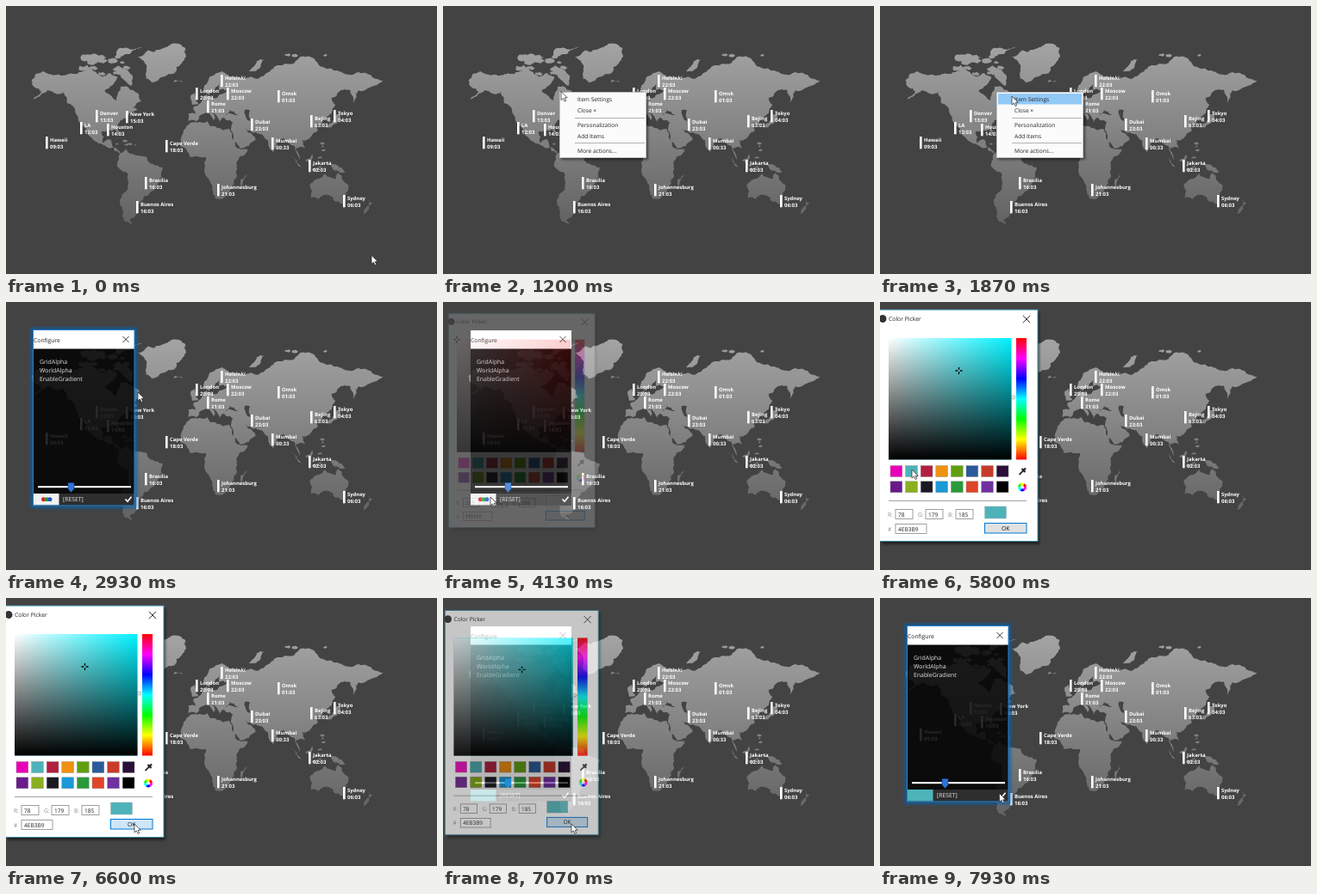
An HTML page for the animation above (8 s loop, 500x312 px).

```html
<!DOCTYPE html>
<html lang="en">
<head>
<meta charset="utf-8">
<style>
  html, body { margin: 0; width: 100%; height: 100%; overflow: hidden; background: #434343; }
  svg { display: block; width: 100%; height: 100%; font-family: "Open Sans", "Noto Sans", sans-serif; text-rendering: geometricPrecision; }
</style>
</head>
<body>
<svg id="stage" viewBox="0 0 500 312"></svg>
<script>
// Key points of the coasts as "longitude,latitude"; the detail between them is generated
const COASTS = [
  "-168,66 -156,71 -128,70 -96,68 -88,70 -81,68 -94,60 -82,53 -78,62 -65,60 -56,52 -66,48 -61,46 -70,42 -81,31 -80,25 -84,30 -97,28 -96,18 -88,21 -84,10 -78,8 -92,14 -105,20 -113,31 -118,34 -124,46 -135,59 -152,60 -166,54 -158,59 -165,62",
  "-78,8 -72,12 -52,5 -35,-6 -41,-22 -58,-37 -69,-51 -65,-55 -74,-52 -70,-18 -81,-5",
  "-60,78 -50,81 -25,83.5 -12,81.5 -16,75 -35,68 -46,64.5 -52,67 -53,75",
  "-66,63 -74,66 -86,72 -80,74 -66,69",
  "-82,77 -56,82.5 -80,81.5",
  "-24,65 -14,65 -22,66.3",
  "-5,50 1,51 -3,58.5 -6,57",
  "52,71 57,71 68,77 60,76",
  "-6,36 10,37 20,31 33,30 43,12 51,12 40,-4 40,-15 32,-29 19,-34.5 12,-17 9,4 -8,4.5 -17,14 -17,21",
  "44,-17 50,-13 46,-25",
  "-9,37 -1,37 3,42 9,44 16,38 18,40 13,45 19,42 23,36 26,40 36,36 34,29 43,13 59,21 56,25 48,30 56,27 66,25 72,20 77,8 80,15 88,22 94,17 98,15 104,1 100,13 109,12 106,20 114,22 122,29 119,36 126,34 128,40 140,50 136,55 155,60 157,51 163,60 188,66 160,70 128,73 104,78 85,74 68,69 44,67 33,67 41,67 25,71 6,61 12,57 17,60 22,65 22,60 30,60 20,55 9,57 4,52 -4,48 -2,43 -9,43",
  "130,32 140,35 145,43 140,42 137,37",
  "95,5 106,-6 102,-4",
  "109,1 117,7 116,-4",
  "131,-1 147,-6 150,-10 138,-8",
  "114,-22 130,-12 140,-17 142,-11 153,-26 147,-39 131,-31 115,-34",
  "173,-35 178,-38 168,-46.5 174,-41"
];
const SEAS = ["28,42 41,42 33,46", "48,46 53,46 53,37"];

// Island groups: left, top, width, height, count, size
const ISLANDS = [[88, 55, 58, 25, 18, 4], [355, 160, 14, 32, 8, 2], [128, 157, 22, 6, 5, 1.6], [325, 50, 70, 9, 4, 2]];

// name, time, text x, vertical centre of the name
const CITIES = [
  ["Helsinki", "22:03", 254, 84], ["London", "20:03", 225, 99], ["Moscow", "22:03", 261, 99],
  ["Rome", "21:03", 238, 114], ["Omsk", "01:03", 320, 102], ["Denver", "13:03", 109, 125],
  ["New York", "15:03", 144, 126], ["LA", "12:03", 91, 139], ["Houston", "14:03", 122, 141],
  ["Hawaii", "09:03", 51, 156], ["Cape Verde", "18:03", 190, 160], ["Dubai", "23:03", 289, 135],
  ["Mumbai", "00:33", 313, 157], ["Bejing", "03:03", 358, 131], ["Tokyo", "04:03", 385, 125],
  ["Jakarta", "02:03", 356, 183], ["Brasília", "16:03", 166, 203], ["Johannesburg", "21:03", 250, 211],
  ["Buenos Aires", "16:03", 156, 231], ["Sydney", "06:03", 396, 224]
];
const SWATCHES = "#e800b8 #4eb3b9 #b02040 #f09010 #60a010 #2a5a9a #c83a2a #2a1038 #6a1a8a #8ab020 #1a1a22 #1a9ad8 #2a9a3a #e0452a #7030a0 #000".split(" ");

const rect = (x, y, w, h, fill, more = "") => `<rect x="${x}" y="${y}" width="${w}" height="${h}" fill="${fill}" ${more}/>`;
const circle = (x, y, r, fill, more = "") => `<circle cx="${x}" cy="${y}" r="${r}" fill="${fill}" ${more}/>`;
const text = (x, y, str, fill, size = 6.8, more = "") => `<text x="${x}" y="${y}" fill="${fill}" font-size="${size}" ${more}>${str}</text>`;
const line = (d, color, width = 1, more = "") => `<path d="${d}" fill="none" stroke="${color}" stroke-width="${width}" ${more}/>`;
const cross = (x, y, r, color) => line(`M${x - r},${y - r}l${2 * r},${2 * r}m0,${-2 * r}l${-2 * r},${2 * r}`, color, .9);
const gradient = (id, axis, colors) => `<linearGradient id="${id}" ${axis}>` +
  colors.map((c, i) => `<stop offset="${i / (colors.length - 1)}" stop-color="${c}"/>`).join("") + "</linearGradient>";

let seed = 7;
const random = () => (seed = seed * 16807 % 2147483647) / 2147483647;

// Miller projection
function project(point) {
  const [lon, lat] = point.split(",").map(Number);
  const miller = 1.25 * Math.log(Math.tan(Math.PI / 4 + .4 * lat * Math.PI / 180)) * 180 / Math.PI;
  return [222 + 1.145 * lon, 181 - 1.21 * miller];
}

// Points from a to b with random midpoint displacement
function rough(a, b) {
  const dx = b[0] - a[0], dy = b[1] - a[1];
  if (Math.hypot(dx, dy) < 2.5) return [a];
  const shift = (random() - .5) * .36;
  const mid = [(a[0] + b[0]) / 2 - dy * shift, (a[1] + b[1]) / 2 + dx * shift];
  return [...rough(a, mid), ...rough(mid, b)];
}
function shape(points, fill) {
  const coast = points.flatMap((p, i) => rough(p, points[(i + 1) % points.length]));
  return `<polygon points="${coast.map(p => p.map(v => v.toFixed(1))).join(" ")}" fill="${fill}"/>`;
}
const outline = (coast, fill) => shape(coast.split(" ").map(project), fill);

function islands([left, top, width, height, count, size]) {
  return Array.from({ length: count }, () => {
    const x = left + random() * width, y = top + random() * height, r = size * (.5 + random());
    return shape([0, 1, 2, 3, 4].map(k => [x + 1.4 * r * Math.cos(k * 1.257), y + .7 * r * Math.sin(k * 1.257)]), "url(#land)");
  }).join("");
}

const hues = Array.from({ length: 7 }, (_, i) => `hsl(${360 - i * 60},100%,50%)`);
const defs = `<defs>
  ${gradient("land", 'gradientUnits="userSpaceOnUse" x1="0" y1="45" x2="0" y2="255"', ["#a3a3a3", "#626262"])}
  ${gradient("toWhite", "", ["#fff", "#fff0"])}
  ${gradient("toBlack", 'x2="0" y2="1"', ["#0000", "#000"])}
  ${gradient("hues", 'x2="0" y2="1"', hues)}
  <filter id="soft" x="-20%" y="-20%" width="140%" height="140%"><feGaussianBlur stdDeviation="1.6"/></filter>
</defs>`;

const world = COASTS.map(c => outline(c, "url(#land)")).join("") +
  SEAS.map(c => outline(c, "#434343")).join("") + ISLANDS.map(islands).join("");

const cities = CITIES.map(([name, time, x, y]) =>
  rect(x - 5, y - 4, 2.6, 14.3, "#fff") + text(x, y + 2, name, "#fff", 5.9) + text(x, y + 10, time, "#fff", 6)).join("");

const menu = rect(137, 102, 101, 77, "#000", 'opacity=".45" filter="url(#soft)"') +
  rect(135.5, 100.5, 100, 76, "#fbfbfb", 'stroke="#c4c4c4"') +
  rect(137, 102, 97, 12.5, "#91c9f7", 'id="hover"') +
  line("M153,130.5h81M153,159.5h81", "#a0a0a0", .8) +
  [["Item Settings", 108], ["Close ×", 121], ["Personalization", 138], ["Add Items", 151], ["More actions...", 168]]
    .map(([str, y]) => text(156, y + 2.5, str, "#222", 6.6)).join("");

const configure = rect(30.5, 32, 119.5, 206, "none", 'id="glow" stroke="#0a62b0" stroke-width="5" stroke-opacity=".6" filter="url(#soft)"') +
  rect(32, 54, 117, 183, "#000", 'opacity=".84"') +
  rect(32, 33, 117, 21.5, "#fff") + text(32, 46.5, "Configure", "#222") + cross(139, 43.5, 3.5, "#222") +
  ["GridAlpha", "WorldAlpha", "EnableGradient"].map((str, i) => text(39, 72 + i * 10, str, "#e4e4e4", 6.9)).join("") +
  rect(37, 214.2, 108, 2, "#fff") +
  '<path d="M72,210.5h7v7l-3.5,4l-3.5,-4z" fill="#2f74d8" stroke="#163f86" stroke-width=".6"/>' +
  rect(32, 223, 117, 14, "#2e2e2e") + rect(32, 223, 29.5, 13.5, "#f2f2f2", 'id="colorButton"') +
  `<g id="dots">${["#e02020", "#20a030", "#2050d0"].map((c, i) => circle(43.5 + i * 3.7, 229.7, 2.5, c)).join("")}</g>` +
  text(66, 232.3, "[RESET]", "#e4e4e4") + line("M138.5,229.5l2.5,2.7l4.5,-5.5", "#fff", 1.6) +
  rect(31.5, 32.5, 117.5, 204.5, "none", 'id="frame" stroke="#2a80c8"');

const field = (label, id, x, y, w) => text(9 + x, y + 8, label, "#888", 6.6) +
  rect(18 + x, y, w, 11, "#fff", 'stroke="#888" stroke-width=".8"') + text(21 + x, y + 8, "", "#222", 6.6, `id="${id}"`);
const square = (fill, id = "") => rect(10, 42, 142.5, 141.5, fill, id);
const wheel = hues.slice(1).map((c, i) =>
  `<path d="M165,215.5h5a5,5 0 0 1 -2.5,4.33z" fill="${c}" transform="rotate(${i * 60} 165 215.5)"/>`).join("");

const picker = rect(2, 12, 183, 270, "#000", 'opacity=".5" filter="url(#soft)"') +
  rect(-.5, 9, 183.5, 269.5, "#fff", 'stroke="#3a8fa8"') + circle(3, 19.5, 4.5, "#333") +
  text(10, 22, "Color Picker", "#222") + cross(170, 20, 4.2, "#222") +
  square("#f00", 'id="hueBase"') + square("url(#toWhite)") + square("url(#toBlack)") +
  line("M-4,0h2.7M1.3,0h2.7M0,-4v2.7M0,1.3v2.7", "#000", 1.3, 'id="crosshair"') +
  rect(158, 42, 12, 141.5, "url(#hues)") + circle(154.8, 42, 2, "#fff", 'id="hueMark" stroke="#999" stroke-width=".8"') +
  SWATCHES.map((c, i) => rect(12 + i % 8 * 17.6, 190.5 + (i >> 3) * 18.3, 13.8, 13, c, 'stroke="#888" stroke-width=".4"')).join("") +
  line("M161.5,201l5,-5", "#333", 1.8) + line("M164.5,194l4,4M166.5,196l2.5,-2.5", "#222", 2.2) +
  wheel + circle(165, 215.5, 2, "#fff") + line("M10,231.5H170", "#999", .9) +
  field("R:", "red", 0, 241.5, 20) + field("G:", "green", 35, 241.5, 20) + field("B:", "blue", 70, 241.5, 20) + field("#", "hex", 0, 258.5, 36) +
  rect(121.5, 238, 25, 14, "#fff", 'id="preview" stroke="#aaa" stroke-width=".4"') +
  rect(121.5, 257.5, 48.5, 11.5, "#e1e1e1", 'id="ok" stroke="#0078d7"') +
  text(145.7, 265.7, "OK", "#111", 6.8, 'text-anchor="middle"');

const arrow = '<path d="M0,0V10L2.4,7.9L4,11.5L5.7,10.8L4.2,7.3H7.2Z" fill="#fff" stroke="#222" stroke-width=".7"/>';

document.getElementById("stage").innerHTML = defs + rect(0, 0, 500, 312, "#434343") + world +
  `<g font-weight="700">${cities}</g><g id="menu">${menu}</g><g id="configure">${configure}</g><g id="picker">${picker}</g><g id="cursor">${arrow}</g>`;

const $ = id => document.getElementById(id);
const set = (id, attrs) => { for (const key in attrs) $(id).setAttribute(key, attrs[key]); };
const progress = (t, from, to) => Math.min(1, Math.max(0, (t - from) / (to - from)));
const ease = p => p * p * (3 - 2 * p);
const scaleAbout = (x, y, s, dy = 0) => `translate(${x} ${y + dy}) scale(${s}) translate(${-x} ${-y})`;

// start, end, target of each pointer move
const MOVES = [
  [70, 730, 137, 99.5], [1300, 1730, 153, 105], [2930, 3730, 55, 227],
  [5000, 5600, 37, 195], [6000, 6600, 149, 263], [7350, 7900, 138.5, 227.5]
];
function pointer(t) {
  let x = 424, y = 290.3;
  for (const [from, to, tx, ty] of MOVES) {
    const p = ease(progress(t, from, to));
    x += (tx - x) * p;
    y += (ty - y) * p;
  }
  return `translate(${x} ${y})`;
}

function render(t) {
  set("cursor", { transform: pointer(t) });
  set("menu", { opacity: t < 2270 ? progress(t, 930, 1130) : 1 - progress(t, 2270, 2400) });
  set("hover", { opacity: t > 1480 ? 1 : 0 });

  const shown = progress(t, 2300, 2600);
  const active = t < 3870 || t > 7270 ? 1 : 0;
  const applied = t > 6870;
  set("configure", { opacity: shown, transform: scaleAbout(90, 135, .9 + .1 * ease(shown)) });
  set("glow", { opacity: active });
  set("frame", { opacity: active });
  set("colorButton", { fill: applied ? "#4eb3b9" : "#f2f2f2" });
  set("dots", { opacity: applied ? 0 : 1 });

  const opening = progress(t, 4000, 4400), closing = progress(t, 6970, 7270);
  set("picker", {
    opacity: opening ** 1.5 * (1 - closing ** 1.1),
    transform: scaleAbout(92, 144, 1 - .11 * (1 - opening) - .09 * closing, 4 * closing - 8.6 * (1 - opening))
  });

  const picked = t > 5680;
  set("hueBase", { fill: picked ? "#00f2ff" : "#f00" });
  set("crosshair", { transform: picked ? "translate(91.5 80)" : "translate(10 42)" });
  set("hueMark", { cy: picked ? 111 : 42 });
  set("preview", { fill: picked ? "#4eb3b9" : "#fff" });
  const values = picked ? ["78", "179", "185", "4EB3B9"] : ["255", "255", "255", "FFFFFF"];
  ["red", "green", "blue", "hex"].forEach((id, i) => $(id).textContent = values[i]);
  set("ok", { fill: t > 6450 ? "#cfe6f8" : "#e1e1e1" });
}

const start = performance.now();
function tick() {
  render((performance.now() - start) % 8000);
  requestAnimationFrame(tick);
}
tick();
</script>
</body>
</html>
```
